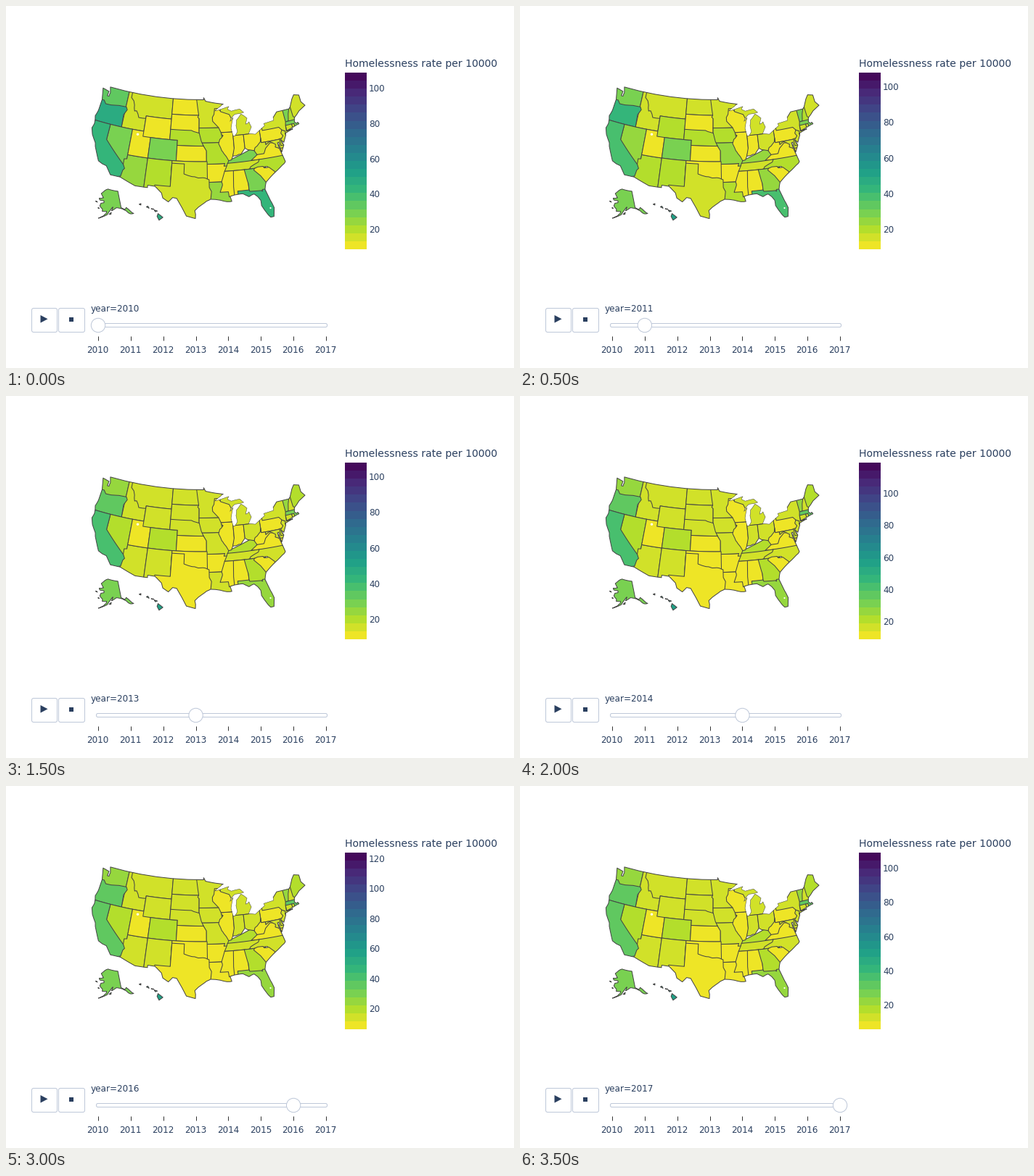
Recreate the animation shown at these times as a matplotlib script. Size 700 by 500 pixels, loop 4 s.

```python
import numpy as np
import matplotlib.pyplot as plt
from matplotlib.animation import FuncAnimation
from matplotlib.patches import Circle, FancyBboxPatch, PathPatch, Polygon, Rectangle
from matplotlib.path import Path

W, H, DPI = 700, 500, 100
PX = 72 / DPI
INK, EDGE, BORDER = "#2a3f5f", "#444444", "#bec8d9"
YEARS = range(2010, 2018)
BAR_X, BAR_TOP, BAR_BOTTOM = 467, 92, 336
BANDS = 22
SCALE = ["#440154", "#482878", "#3e4989", "#31688e", "#26828e",
         "#1f9e89", "#35b779", "#6ece58", "#b5de2b", "#fde725"]
LOWS = [8.9, 9, 9.95, 9, 9.15, 7.3, 6.6, 6]
HIGHS = [109, 108.1, 112.1, 108, 119.4, 110.6, 124, 109.3]

rng = np.random.default_rng(4)
plt.rcParams["font.family"] = "DejaVu Sans"
fig = plt.figure(figsize=(W / DPI, H / DPI), dpi=DPI, facecolor="white")
ax = fig.add_axes([0, 0, 1, 1])
ax.set_xlim(0, W)
ax.set_ylim(H, 0)
ax.axis("off")


def band_color(level):
    """Colour of a band, counted from the bottom of the colour bar."""
    stops = np.array([[int(c[i:i + 2], 16) / 255 for i in (1, 3, 5)] for c in SCALE])
    pos = (1 - (level + 0.5) / BANDS) * (len(SCALE) - 1)
    return tuple(np.interp(pos, range(len(SCALE)), stops[:, i]) for i in range(3))


COLORS = [band_color(i) for i in range(BANDS)]


def label(x, y, text, size=12, ha="left"):
    return ax.text(x, y, text, fontsize=size * PX, color=INK, ha=ha, va="baseline")


# ---- map projection (longitudes are degrees west) ----

def conic(par1, par2, lon0, center, k, shift):
    s1, s2 = np.sin(np.radians([par1, par2]))
    n = (s1 + s2) / 2
    c = 1 + s1 * (2 * n - s1)

    def raw(lon, lat):
        r = np.sqrt(c - 2 * n * np.sin(np.radians(lat))) / n
        a = n * np.radians(lon0 - lon)
        return np.array([r * np.sin(a), r * np.cos(a)])

    origin = raw(*center)
    return lambda lon, lat: k * (raw(lon, lat).T - origin) + shift


K, CX, CY = 406.8, 265.1, 202.8
MAIN = conic(29.5, 45.5, 96, (96.6, 38.7), K, (CX, CY))
NORTH = conic(55, 65, 154, (156, 58.5), 0.35 * K, (CX - 0.307 * K, CY + 0.201 * K))
ISLES = conic(8, 18, 157, (160, 19.9), K, (CX - 0.205 * K, CY + 0.212 * K))


def project(points, proj=MAIN):
    """Project a line, subdivided so that parallels come out curved."""
    pts = np.array(points, float)
    t = np.arange(0, len(pts) - 0.99, 1 / 6)
    lon, lat = (np.interp(t, range(len(pts)), pts[:, i]) for i in (0, 1))
    return proj(lon, lat)


def closed(ring, proj=MAIN):
    return Path(project(ring + ring[:1], proj), closed=True)


def rough(points, amp=0.07):
    """Add a randomly shifted point in the middle of every stretch."""
    out = points[:1]
    for a, b in zip(points, points[1:]):
        mid = (np.array(a) + b) / 2 + rng.normal(0, amp, 2)
        out = out + [tuple(mid), b]
    return out


def block(west, east, south, north):
    return [(west, north), (east, north), (east, south), (west, south)]


# ---- coasts and national borders, clockwise round the country reversed ----

PACIFIC = rough([(122.75, 49), (122.3, 47.9), (122.4, 47.2), (122.9, 47.2), (122.8, 48.1), (124.7, 48.4),
                 (124, 46.2), (124.1, 44), (124.5, 42.8), (124.1, 41.3), (124.4, 40.4), (123.8, 39.2),
                 (122.5, 37.8), (121.9, 36.6), (120.6, 34.6), (118.5, 34.05), (117.1, 32.53)], 0.04)
SOUTH = [(114.8, 32.5), (111.07, 31.33), (108.2, 31.33), (108.2, 31.8), (106.5, 31.75), (104.9, 30.6),
         (104.5, 29.65), (103.2, 28.98), (102.3, 29.88), (101.4, 29.77), (100.3, 28.3), (99.1, 26.4)]
GULF = rough([(97.15, 25.95), (97.3, 27.5), (95.9, 28.6), (94.7, 29.35), (93.85, 29.7), (91.8, 29.5),
              (90.2, 29.1), (89.1, 29.1), (89.4, 30.1), (88.4, 30.3), (86.5, 30.4), (85.2, 29.7),
              (84, 30.1), (82.7, 28.7), (82.7, 27.7), (81.8, 26.1), (81.1, 25.15)])
ATLANTIC = rough([(80.4, 25.2), (80.05, 26.9), (80.6, 28.4), (81.4, 30.7), (80.9, 32.05), (79.2, 33.2),
                  (77.9, 33.9), (76.5, 34.7), (75.55, 35.25), (76, 36.9), (76.35, 38.1), (76.5, 39.1),
                  (76.15, 39.2), (76.2, 38.6), (75.95, 37.2), (75.05, 38.45), (75.5, 39.5), (74.9, 38.95),
                  (74, 40.2), (73.95, 40.6), (71.9, 41.07), (73.6, 40.95), (71.4, 41.45), (69.95, 41.7),
                  (70.15, 42.05), (70.6, 41.9), (71, 42.3), (70.7, 43.07), (69, 44.1), (67, 44.8)], 0.03)
NORTH_EAST = [(67.8, 45.7), (67.8, 47.07), (69.2, 47.4), (70, 46.7), (71.08, 45.3), (71.5, 45), (75, 45)]
LAKES = rough([(76.2, 44.1), (76.3, 43.5), (79.05, 43.27), (78.9, 42.85), (81.7, 41.5), (83.45, 41.73),
               (82.45, 43), (82.9, 44.05), (83.9, 43.7), (83.3, 44.8), (84.8, 45.75), (85.6, 45.1),
               (86.2, 44.7), (86.5, 43.6), (86.3, 42.4), (87, 41.68), (87.53, 41.7), (87.9, 43.2),
               (87.5, 44.4), (87.1, 45.2), (88, 44.55), (87.6, 45.1), (86.5, 45.85), (84.75, 45.9),
               (84, 46), (85, 46.75), (87.4, 46.5), (88.4, 46.9), (88, 47.45), (90.8, 46.9),
               (92.1, 46.75), (89.6, 48)], 0.04)
BORDER_49 = [(92, 48.3), (94.6, 48.7), (95.15, 49.4), (95.15, 49)]
LAND = closed(PACIFIC + SOUTH + GULF + ATLANTIC + NORTH_EAST + LAKES + BORDER_49)

regions = []


def levels(start, end, bump):
    """Colour bands over the years: settling from start to end, with a rise around 2012."""
    i = np.arange(len(YEARS))
    rise = bump * np.where(i <= 2, i / 2, 0)
    return np.rint(end + (start - end) * 0.6 ** i + rise).astype(int)


def region(path, start, end=None, bump=0, clip=None):
    patch = ax.add_patch(PathPatch(path, ec=EDGE, lw=PX, joinstyle="round"))
    if clip is not None:
        patch.set_clip_path(clip, ax.transData)
    regions.append((patch, levels(start, start if end is None else end, bump)))


def state(ring, *rates):
    """A state painted over its earlier neighbours and cut off at the coast."""
    region(closed(ring), *rates, clip=LAND)


# ---- west ----

state(block(125.5, 117.03, 45, 50), 5, 2.7)
state(block(117.03, 111.05, 42, 50), 1)
state(rough([(116.05, 48), (114.8, 46.7), (114.45, 45.55), (113.9, 45.65), (113, 44.45), (111.05, 44.5)])
      + [(111.05, 45), (104.05, 45), (104.05, 50), (116.05, 50)], 1)
state([(125, 46.2), (123.4, 46.2), (122.7, 45.6), (121.2, 45.65), (119, 45.95), (116.92, 46),
       (116.5, 45.5), (117.2, 44.4), (117.03, 42), (125, 42)], 8, 4.5)
state(block(120, 114.04, 34.5, 42), 4, 2)
state([(114.04, 37), (109.05, 37), (109.05, 31), (115, 31), (114.65, 35), (114.7, 36.1),
       (114.04, 36.2)], 3, 0.8)
state([(125, 42), (120, 42), (120, 39), (114.63, 35), (114.15, 34.3), (114.5, 33.9), (114.72, 32.7),
       (117, 32), (125, 32)], 7, 5.4)
state(block(114.04, 109.05, 37, 42), 0)
state(block(111.05, 104.05, 41, 45), 0, 1, 3.5)
state(block(109.05, 102.05, 37, 41), 4, 1.5, 2.5)
state(block(109.05, 103.03, 31, 37), 2, 1)

# ---- plains and south centre ----

state(block(104.05, 96, 45.95, 50), 0, 1.3)
state(block(104.05, 96.45, 42.5, 45.95), 0, 0.8)
state(block(96.45, 90, 40.6, 43.5), 2, 1)
state(block(94.6, 89.5, 33, 36.5), 0)
state(block(94.3, 88.9, 28.8, 33), 3, 0)
state([(95.8, 40.6), (89, 40.6), (89, 36), (90.37, 36), (90.15, 36.5), (94.62, 36.5), (94.62, 39),
       (95.3, 40)], 2, 1, 2.5)
state([(104.05, 43), (98.5, 43), (97.9, 42.8), (96.4, 42.5), (95.85, 40.9), (95.3, 40), (102.05, 40),
       (102.05, 41), (104.05, 41)], 2.4, 1)
state([(102.05, 40), (95.3, 40), (94.6, 39.1), (94.62, 37), (102.05, 37)], 0)
state(block(103.03, 94.45, 33.3, 37), 0.7, 0)
state([(103.03, 36.5), (100, 36.5)]
      + rough([(100, 34.56), (98.1, 34.1), (96.6, 33.85), (95.5, 33.9), (94.48, 33.65)])
      + [(94.04, 33.5), (94.04, 32), (93.55, 31.2), (93.8, 29.5), (94, 25), (107, 25), (106.62, 32),
         (103.03, 32)], 1, 0)

# ---- great lakes and the middle ----

state(block(90.5, 82, 41.73, 48), 1)
state([(97.2, 50), (97.2, 49), (96.8, 47), (96.56, 45.95), (96.85, 45.6), (96.45, 45.3), (96.45, 43.5),
       (91, 43.5), (91, 47), (89, 48.5), (94, 50)], 1)
state([(89.5, 36.4), (89.15, 37), (82, 39.2), (82, 36.5)], 4, 2)
state(rough([(90.64, 42.5), (90.15, 41.9), (91.05, 41.2), (91.42, 40.4), (90.7, 39), (90.2, 38.4),
             (89.15, 37)]) + [(88.45, 37.1), (88.05, 37.8), (87.53, 39), (87.53, 42.5)], 0)
state([(87.53, 41.75), (87.53, 39.35), (88.05, 37.8)] + rough([(87.1, 37.85), (86, 38), (84.82, 39.1)])
      + [(84.82, 41.75)], 0, 0.6)
state([(92.1, 47.2), (92.3, 46.1), (92.8, 45.5), (92.75, 44.75), (91.22, 43.5), (90.64, 42.5), (87, 42.5),
       (86.8, 45.3), (87.6, 45.1), (88.1, 45.9), (90.4, 46.55), (91, 47.2)], 0)

# ---- north east ----

state(block(80.52, 74.7, 39.72, 42.4), 0)
state(block(79.48, 75, 37.9, 39.72), 1)
state(block(75.79, 75, 38.46, 39.8), 1)
state([(74.7, 41.36), (75.15, 40.8), (74.75, 40.2), (75.5, 39.6), (75.3, 38.8), (73.7, 39), (73.8, 41)], 1)
state(block(71.2, 66.5, 43, 48), 1, 2)
state(block(73.45, 71.5, 42.73, 45.2), 4, 3)
state([(72.5, 42.7), (72.05, 44.1), (71.5, 45.1), (71.08, 45.4), (70.97, 43.4), (70.5, 43), (70.5, 42.5)],
      2, 1)
state(block(73.5, 69.5, 41.3, 42.73), 4, 4.6)
state(block(73.5, 71.8, 40.9, 42.04), 1)
state(block(71.83, 71.2, 41.2, 42.02), 1)
state([(79.76, 42.6), (79.76, 42), (75.35, 42), (74.7, 41.36), (73.9, 41), (74.1, 40.4), (71.7, 41),
       (73.6, 41.05), (73.5, 42.05), (73.25, 42.75), (73.35, 45.2), (76, 45.5), (80, 43.5)], 1)

# ---- south east ----

state([(82.6, 38.4), (82, 37.5), (79, 37.5), (77.75, 39.3), (78.4, 39.65), (79.48, 39.2), (79.48, 39.72),
       (80.52, 39.72), (80.52, 40.64), (82, 40)], 0.6, 0)
state([(84.82, 41.73), (84.82, 39.1)] + rough([(84.2, 38.75), (82.6, 38.4), (81.7, 39.2), (80.75, 39.9)])
      + [(80.52, 40.64), (80.52, 42.3), (83.45, 41.73)], 0.4, 1)
state([(83.68, 36.6), (82, 37.55), (80.3, 37.55), (79.7, 38.5), (78.35, 39.4), (77.75, 39.3),
       (77.05, 38.9), (77.25, 38.4), (76.2, 37.95), (75, 38), (75, 36.4)], 0)
state([(90.3, 35), (89.7, 36), (89.5, 36.5), (81.68, 36.59), (82, 35)], 1)
state([(84.3, 35), (84, 35.4), (83.1, 35.75), (82, 36.1), (81.68, 36.59), (75, 36.55), (75, 33.4),
       (79, 33.4), (80, 35)], 2.4, 1)
state(rough([(91.15, 33), (91, 32.3), (91.6, 31)])
      + [(89.73, 31), (89.6, 30), (88, 30), (88, 35), (90.3, 35)], 0)
state([(88.2, 35), (85, 35), (85, 30), (88.4, 30), (88.45, 31.9)], 0)
state([(85.6, 35), (80.5, 35), (80.5, 30.4), (85, 30.4), (85, 32.2), (85.15, 32.8)], 4.3, 2)
state([(83.35, 34.7), (83.1, 35), (82.3, 35.2), (81.05, 35.15), (80.8, 34.82), (79.67, 34.8),
       (78.5, 33.8), (78.5, 32), (80.9, 32), (81.4, 32.7), (81.95, 33.45)], 0)
state([(87.6, 31), (85, 31), (84.87, 30.7), (82.2, 30.57), (82.05, 30.4), (82, 30.75), (80, 30.75),
       (79, 25), (83, 24), (87.5, 29)], 7, 2.5, 2.5)

# Lake shores are drawn finer than the other outlines.
for line, width in ((LAKES, 0.5), (LAKES[-1:] + BORDER_49 + PACIFIC + SOUTH + GULF + ATLANTIC
                                   + NORTH_EAST + LAKES[:1], 1)):
    ax.plot(*project(line).T, color=EDGE, lw=width * PX)

# ---- insets ----

mainland = rough([(141, 60.3), (137.5, 58.9), (135.5, 59.75), (131.8, 56.6), (130, 55.3), (133.5, 55.8),
                  (136.5, 58), (139.8, 59.5), (146, 60.7), (149.7, 59.7), (151.8, 59.2), (150.3, 61.2),
                  (153.5, 59.3), (156.5, 57), (164.7, 54.6), (160, 56.3), (157.7, 57.6), (157.2, 58.8),
                  (161.9, 58.7), (162, 59.9), (165.4, 61.5), (164.7, 63), (161, 63.6), (161.2, 64.5),
                  (166.3, 64.6), (168, 65.6), (162.5, 66.2), (166.5, 68.35), (161.9, 70.3),
                  (156.6, 71.3), (141, 69.65)], 0.15)
offshore = [[(152.3, 58.3), (152.7, 57.2), (154.6, 57.3)],
            [(171.6, 63.5), (169.2, 63.2), (170.2, 63.6)],
            [(167.2, 60.2), (165.8, 59.9), (166, 60.3)]]
islands = [[(155.85, 20.25), (154.85, 19.5), (155.65, 18.95), (156.05, 19.7)],
           [(156.65, 20.95), (156, 20.75), (156.4, 20.6)],
           [(157.25, 21.2), (156.75, 21.15), (156.85, 21.05)],
           [(158.25, 21.55), (157.95, 21.7), (157.7, 21.3)],
           [(159.75, 22.05), (159.4, 22.2), (159.4, 21.9)]]
region(Path.make_compound_path(*(closed(r, NORTH) for r in [mainland] + offshore)), 4.4, 4)
region(Path.make_compound_path(*(closed(r, ISLES) for r in islands)), 8, 9.5)

for x, y, r in ((181.5, 177.2, 1.7), (364.5, 279, 1.1)):
    ax.add_patch(Circle((x, y), r, fc="white", ec="none", zorder=3))

# ---- colour bar ----

band_h = (BAR_BOTTOM - BAR_TOP) / BANDS
for i, color in enumerate(COLORS):
    ax.add_patch(Rectangle((BAR_X, BAR_BOTTOM - (i + 1) * band_h), 30, band_h,
                           fc=color, ec="none", antialiased=False))
label(467.3, 84, "Homelessness rate per 10000", 14)
ticks = [(v, label(500, 0, str(v))) for v in range(20, 121, 20)]

# ---- buttons and slider ----


def box(x, y, w, h, r):
    ax.add_patch(FancyBboxPatch((x, y), w, h, boxstyle=f"round,pad=0,rounding_size={r}",
                                fc="white", ec=BORDER, lw=PX))


def slot(i):
    return 127 + 44.86 * i


box(35.5, 417.5, 35, 33, 2.5)
box(72.5, 417.5, 36, 33, 2.5)
ax.add_patch(Polygon([(47.5, 427), (57.5, 432.3), (47.5, 437.6)], fc=INK, ec="none"))
ax.add_patch(Rectangle((86.7, 429.5), 6.4, 6.4, fc=INK, ec="none"))
box(124.5, 438.5, 318, 5, 2)
for i, year in enumerate(YEARS):
    ax.plot([slot(i)] * 2, [456, 462], color="#333333", lw=PX, solid_capstyle="butt")
    label(slot(i) - 0.4, 479, str(year), ha="center")
knob = ax.add_patch(Circle((slot(0), 441), 9.7, fc="white", ec=BORDER, lw=PX, zorder=5))
caption = label(117, 422, "")


def update(i):
    for patch, bands in regions:
        patch.set_facecolor(COLORS[bands[i]])
    low, high = LOWS[i], HIGHS[i]
    for value, text in ticks:
        y = BAR_BOTTOM - (value - low) / (high - low) * (BAR_BOTTOM - BAR_TOP)
        text.set_y(y + 4.2)
        text.set_visible(value <= high)
    knob.center = (slot(i), 441)
    caption.set_text(f"year={YEARS[i]}")
    return []


anim = FuncAnimation(fig, update, frames=len(YEARS), interval=500, repeat=True, repeat_delay=0)
plt.show()
```
